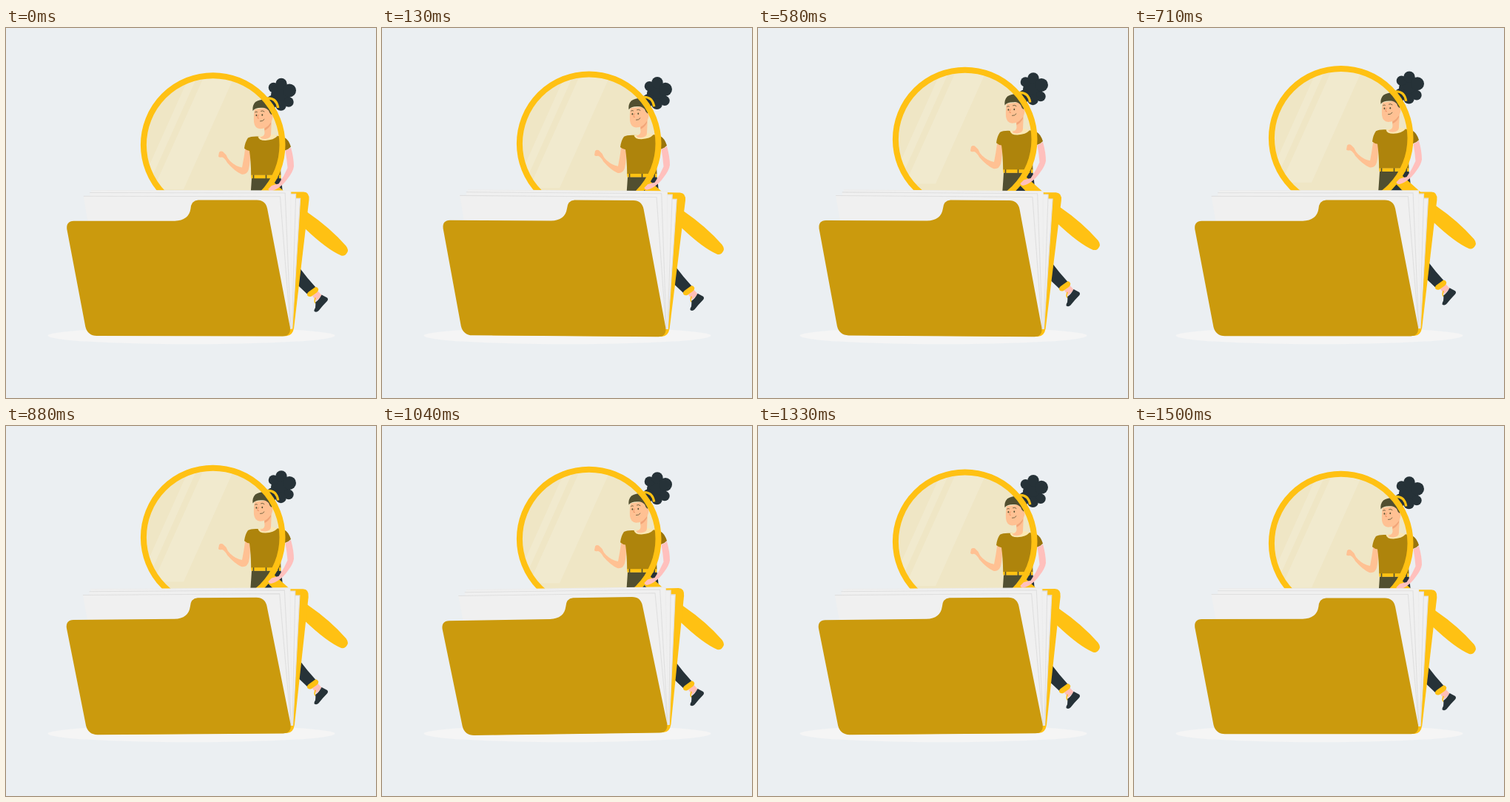
These frames come from a looping animation (500 px wide and 500 px high, 1.54 s). An HTML page:

```html
<!DOCTYPE html>
<html lang="en">
<head>
<meta charset="utf-8">
<title>Folder search</title>
<style>
  html, body { margin: 0; width: 100%; height: 100%; overflow: hidden; background: #ebeff2; }
  svg { display: block; width: 100%; height: 100%; }
</style>
</head>
<body>
<svg viewBox="0 0 500 500">
  <defs>
    <clipPath id="glass"><circle cx="279.7" cy="158" r="92"/></clipPath>
  </defs>
  <rect width="500" height="500" fill="#ebeff2"/>
  <ellipse cx="250.5" cy="415.8" rx="194" ry="11.4" fill="#f5f5f5"/>

  <g id="floater">
    <!-- back leg -->
    <path d="M378 300L397 324.500Q407 338 419 351L408 360.500Q397 350 382 336Z" fill="#263238"/>
    <path d="M414 362L421.500 355.500L427 361.500L419 369Z" fill="#ffbfb8"/>
    <path d="M418.500 364.500Q416 368 418 372" fill="none" stroke="#ffc113" stroke-width="1.500"/>
    <path d="M418 350Q421 349.500 422.200 353Q422.500 355.500 420 357.500L413 362.500Q409.500 364 407.300 361.500Q406 359 409 356.500Z" fill="#ffc113"/>
    <path d="M426.500 360.500L434 364.500Q436 366.500 434 369Q428 375 422.500 382Q419.500 385 416.500 382.800Q416 381 418 378Q418.500 374 418.300 370.500Q423 367.500 426.500 360.500Z" fill="#263238"/>

    <!-- pants and belt -->
    <path d="M332 203H371.500Q374 216 375 245H329Q331 220 332 203Z" fill="#263238"/>
    <path d="M331 198.500H371.500V203.300H331.500Z" fill="#ffc113"/>
    <path d="M334.500 198V204M351.500 198V204M368 198V204" stroke="#263238" stroke-width="1.600"/>

    <!-- bun -->
    <g id="bun" fill="#263238"></g>

    <!-- far arm, neck, shirt -->
    <path d="M323.500 161L330 164.500Q330.500 180 328 191Q325.500 199 318 197.500Q309 193.500 299 182Q296 176 292 174.500Q288 175.500 287 173.500L288 168Q290 165.800 293 167L297.500 171.500Q299.500 177 303 180Q311 187.500 319 188.500Q321.500 176 323.500 161Z" fill="#ffc0b4"/>
    <path d="M341 146.500Q331 146 327 148.500Q323 154 322 162.800Q325.500 165.800 329 166Q331 180 331.200 198.700H371.500Q370.500 180 371.500 166L377 165.500Q382 164 385 160.500Q382 151 376.500 148Q372 146 366.500 145.800Z" fill="#99740b"/>
    <path d="M340.500 146.500Q341.500 152 350.500 152Q362 151.500 367 145.800L360 143.800L347 145.500Z" fill="#f8f0dc"/>
    <path d="M348.500 131L359 122L358 144Q358 149 350 150Q344.500 150 343.500 147.500Q349 146.500 349.500 142Z" fill="#ffc0b4"/>
    <path d="M349.300 135.500Q355 132.500 358 127L358 130Q355 136 349.500 138.500Z" fill="#ee9f93"/>

    <!-- head -->
    <path d="M336 110Q334.500 117 335 127Q336 135.800 343.500 136.300Q352 136 356 129.500Q361 125 360.500 117L358 107Z" fill="#ffc0b4"/>
    <path d="M333.500 112Q332.500 104.500 337 100Q343 96 351 96.500L356 95L366 105L360 110.500Q360 114 359 117.500Q356 115.500 355 111.500Q351 107 345.500 107.800Q337 107.500 333.500 112Z" fill="#263238"/>
    <path d="M353.500 95Q365.500 94.500 367.800 108" fill="none" stroke="#ffc113" stroke-width="3.200"/>
    <ellipse cx="338.400" cy="118" rx=".9" ry="1.300" fill="#263238"/>
    <ellipse cx="346.300" cy="117.500" rx=".9" ry="1.300" fill="#263238"/>
    <path d="M336.500 113.800Q338 112.500 339.500 113.500M344.500 112.300Q347 111 349 113M343.500 126Q347 126.500 349 123.500" fill="none" stroke="#263238" stroke-width=".8" stroke-linecap="round"/>
    <path d="M341.300 117Q339.500 121 340 122H342" fill="none" stroke="#e8877c" stroke-width=".9"/>

    <!-- magnifier -->
    <circle cx="279.700" cy="158" r="92" fill="#ffc113" opacity=".2"/>
    <g clip-path="url(#glass)" fill="#fff" opacity=".16">
      <path d="M250 60H261L190 218H179Z"/>
      <path d="M270 60H311L240 218H199Z"/>
    </g>
    <path d="M353 213L361 207.500Q384 228 408 249.500Q438 270 459.500 294.500Q463.500 300 461 303.500Q458.500 308.500 453 307.500Q434 299.500 404 271Q378 245 353 219Z" fill="#ffc113"/>
    <circle cx="279.700" cy="158" r="93.800" fill="none" stroke="#ffc113" stroke-width="8"/>

    <!-- near arm -->
    <path d="M377.500 165.500Q381.500 164.500 385 161.500Q389 176 389 187Q388 194 381 203Q376 210 371.500 213.500Q365 219 358 220.500Q354.500 219.500 354.500 217.500L359 213Q364 211 368.500 210.500Q376 200 380.500 189Q379.500 177 377.500 165.500Z" fill="#ffc0bd"/>
  </g>

  <g id="folder">
    <path d="M150 240L383 221.300H402Q410.300 221.800 409.300 232L389.300 405Q387.500 415.700 379 416H150Z" fill="#ffc113"/>
    <g id="sheets" stroke="#dfdfdf" stroke-width="1.100"></g>
    <path d="M91.500 261L228 260.700Q247 260 249.300 244.500Q250 233 259.500 232.400H339Q350.500 232.500 353 244L384 404Q385.500 416 374 416.300H123Q110.500 416 107.500 404L82.200 272Q81 261.300 91.500 261Z" fill="#cb9a0d"/>
  </g>
</svg>
<script>
  const NS = "http://www.w3.org/2000/svg";
  const LOOP = 1540, START = 40;
  const get = id => document.getElementById(id);

  function add(parent, tag, attrs) {
    const el = document.createElementNS(NS, tag);
    for (const key in attrs) el.setAttribute(key, attrs[key]);
    parent.appendChild(el);
  }

  // cx, cy, r
  const puffs = [
    [371, 91, 13], [361.5, 80.5, 6.8], [372, 75.5, 7.7], [383, 84.500, 9],
    [382, 100, 6.7], [371.5, 104.500, 7.3], [360, 99, 8]
  ];
  for (const [cx, cy, r] of puffs) add(get("bun"), "circle", { cx, cy, r });

  // left, right, top, foot; back to front
  const pages = [
    [150, 397.5, 230, 387], [140, 391.5, 224, 386.5], [115, 384.5, 219.8, 386],
    [113, 377, 222.800, 385], [104.500, 370.3, 227.500, 384.5]
  ];
  for (const [left, right, top, foot] of pages) {
    const base = `M${left} ${top}H${right}L${foot} 406`;
    add(get("sheets"), "path", { d: base + "H135Z", fill: "#f0f0f0", stroke: "none" });
    add(get("sheets"), "path", { d: base, fill: "none", stroke: top < 220 ? "#ececec" : "#dfdfdf" });
  }

  const lift = p => 10 * (1 - Math.abs(1 - 2 * p));

  // triangle wave: 0, 1, 0, -1, 0
  const sway = p => p < .25 ? 4 * p : p < .75 ? 2 - 4 * p : 4 * p - 4;

  function draw(now) {
    const p = ((now + START) % LOOP) / LOOP;
    get("floater").setAttribute("transform", `translate(0 ${.5 - lift(p)})`);
    get("folder").setAttribute("transform", `rotate(${sway(p)} 246 318)`);
  }

  function tick(now) {
    draw(now);
    requestAnimationFrame(tick);
  }
  draw(0);
  requestAnimationFrame(tick);
</script>
</body>
</html>
```
